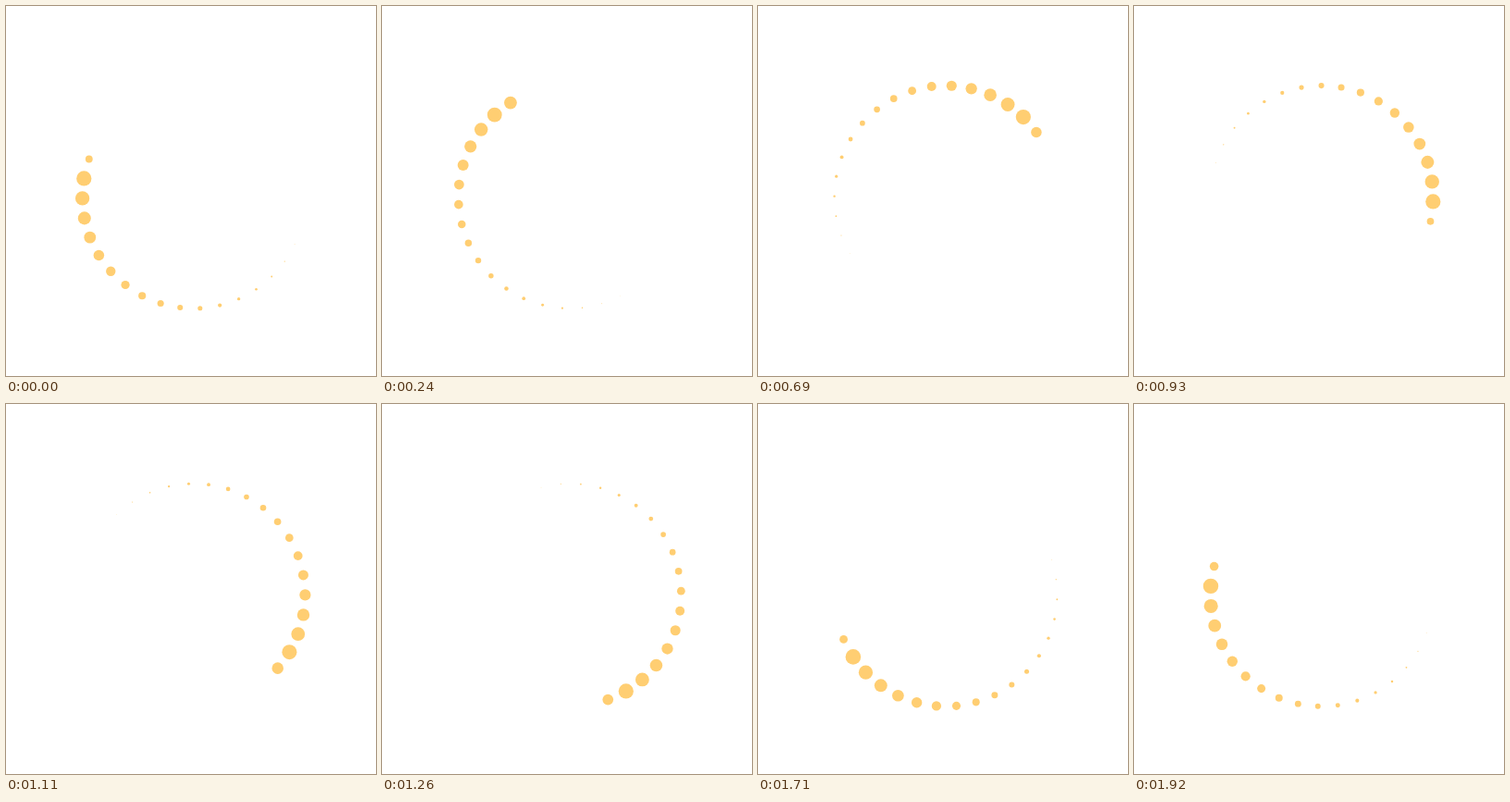
An HTML page with a canvas that plays this animation: 400 px wide and 400 px high, repeating every 1950 ms.

```html
<!DOCTYPE html>
<html lang="en">
<head>
<meta charset="utf-8">
<title>Dot spinner</title>
<style>
html, body { margin: 0; width: 100%; height: 100%; overflow: hidden; background: #fff; }
canvas { display: block; }
</style>
</head>
<body>
<canvas id="stage" width="400" height="400"></canvas>
<script>
const ctx = document.getElementById("stage").getContext("2d");
const STEP = 30, STEPS = 65, DOTS = 35;
const CX = 203, CY = 206.5, RING = 120.4, MAX_R = 8.3;
const GROW = 14, FADE = 188; // degrees behind the leading edge

function dotRadius(lag) {
  if (lag < GROW) return MAX_R * Math.sqrt(lag / GROW);
  const left = 1 - (lag - GROW) / FADE;
  return left > 0 ? MAX_R * left ** 1.5 : 0;
}

function draw(step) {
  const edge = 203 + 5.57 * step; // the head runs clockwise
  const turn = 4.47 - 0.4 * step; // the ring drifts slowly backwards
  ctx.clearRect(0, 0, 400, 400);
  ctx.fillStyle = "#ffce72";
  for (let i = 0; i < DOTS; i++) {
    const angle = turn + i * 360 / DOTS;
    const lag = ((edge - angle) % 360 + 360) % 360;
    const r = dotRadius(lag);
    if (r < 0.2) continue;
    const a = angle * Math.PI / 180;
    ctx.beginPath();
    ctx.arc(CX + RING * Math.cos(a), CY + RING * Math.sin(a), r, 0, 2 * Math.PI);
    ctx.fill();
  }
}

function tick() {
  draw(Math.floor(performance.now() / STEP) % STEPS);
  requestAnimationFrame(tick);
}
tick();
</script>
</body>
</html>
```
